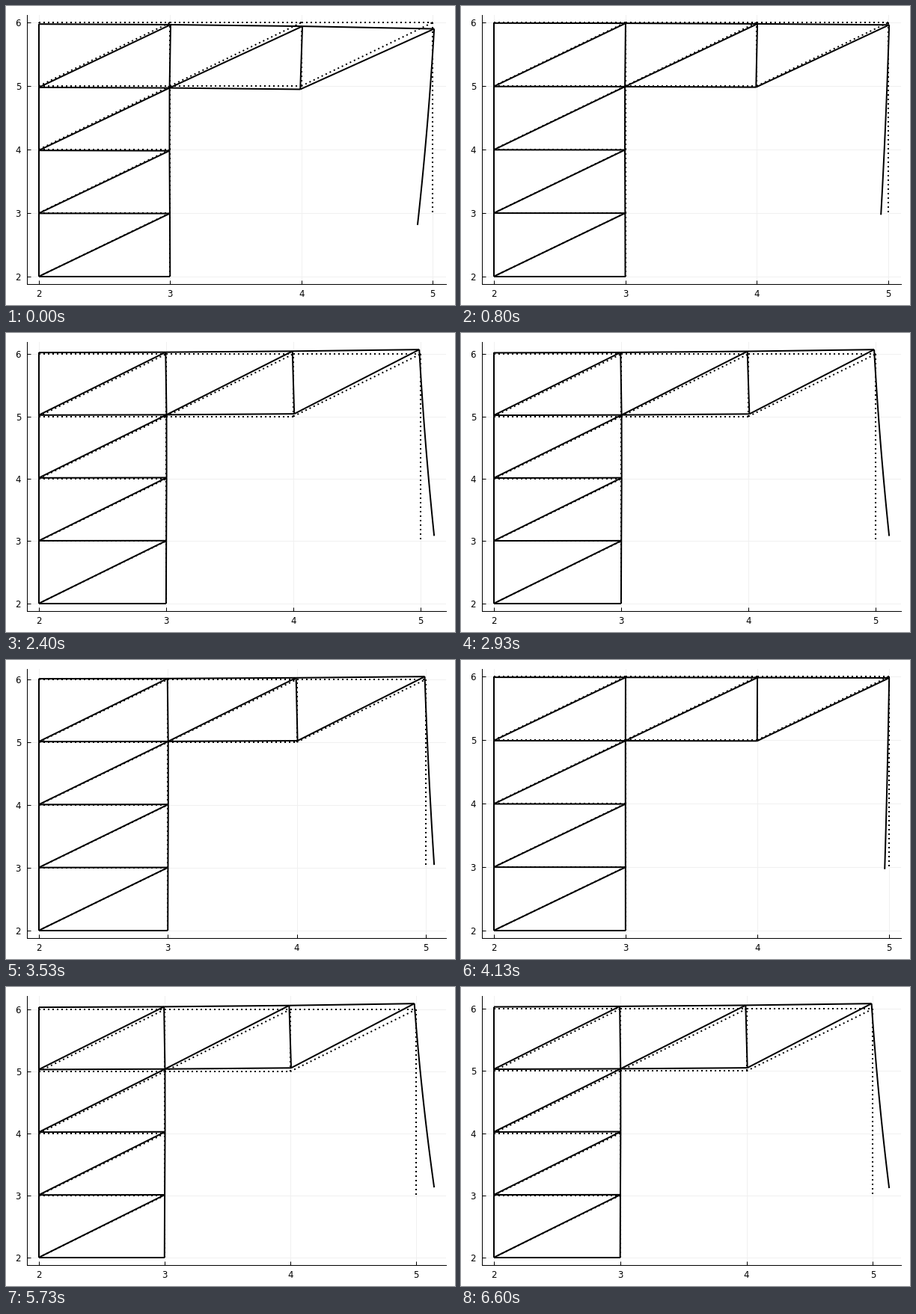
Write a matplotlib script that moves like this. It is 600 px wide and 400 px high and loops after 6670 ms.

```python
"""A plane crane frame swinging freely, drawn over its rest shape."""
import numpy as np
import matplotlib.pyplot as plt
from matplotlib.animation import FuncAnimation
from matplotlib.collections import LineCollection

FRAMES, INTERVAL = 100, 66.6
PT = 0.72  # points per pixel at 100 dpi
TAU = 2 * np.pi
KNEE, TIP = (5, 6), (5, 3)

# Truss bars; the hanging bar is handled apart
BARS = [((x, y), (x, y + 1)) for x in (2, 3) for y in range(2, 6)]
BARS += [((2, y), (3, y)) for y in range(2, 7)]
BARS += [((2, y), (3, y + 1)) for y in range(2, 6)]
BARS += [((x, y), (x + 1, y)) for x, y in ((3, 5), (3, 6), (4, 6))]
BARS += [((x, 5), (x + 1, 6)) for x in (3, 4)]
BARS += [((4, 5), (4, 6))]
BARS = np.array(BARS, float)


def signals(step):
    """Main swing, slow drift and the quickly fading bounce of the load."""
    swing = -np.cos(TAU * 0.2382 * step)
    drift = np.cos(TAU * (step - 14) / 78)
    bounce = -np.exp(-step / 12) * np.cos(TAU * 0.31 * step)
    return swing, drift, bounce


def deflect(points, swing, drift, bounce):
    """Move truss points: the tower stretches, the arm tilts and bends."""
    x, y = points[..., 0], points[..., 1]
    d, h = x - 2, (y - 2) / 4
    rise = np.sin(np.pi * h / 2) ** 1.5
    dx = 0.004 * d * h**2 * (10 - 11 * h) * swing
    dy = rise * ((0.028 + 0.002 * d + 0.0055 * d**2) * swing
                 + (0.010 + 0.0017 * d) * drift
                 + 0.0024 * d**2 * bounce)
    return points + np.stack([dx, dy], axis=-1)


def hanging_bar(knee, swing, drift, bounce):
    """Bar below the knee: swings sideways with a slight bow and stretches."""
    s = np.linspace(0, 1, 25)
    side = 0.137 * swing + 0.024 * drift
    stretch = 0.020 * swing + 0.015 * drift + 0.078 * bounce
    x = knee[0] + side * (0.7 * s + 0.3 * s**2)
    y = knee[1] + s * (TIP[1] - KNEE[1] + stretch)
    return np.column_stack([x, y])


plt.rcParams["font.family"] = "DejaVu Sans"
fig = plt.figure(figsize=(6, 4), dpi=100, facecolor="white")
ax = fig.add_axes([28 / 600, 28 / 400, 560 / 600, 360 / 400])
ax.set_xticks(range(2, 6))
ax.set_yticks(range(2, 7))
ax.tick_params(direction="in", length=5 * PT, width=PT, labelsize=8.5)
ax.tick_params(axis="x", pad=7 * PT)
ax.tick_params(axis="y", pad=8 * PT)
ax.grid(color="#f0f0f0", linewidth=PT)
ax.set_axisbelow(True)
ax.spines[["top", "right"]].set_visible(False)
ax.spines[["left", "bottom"]].set_linewidth(PT)

rest = LineCollection([*BARS, np.array([KNEE, TIP])], colors="black",
                      linewidths=2 * PT, linestyles=[(0, (1, 2))], zorder=3)
moved = LineCollection([], colors="black", linewidths=2 * PT, zorder=4)
ax.add_collection(rest, autolim=False)
ax.add_collection(moved, autolim=False)


def update(step):
    now = signals(step)
    bars = deflect(BARS, *now)
    rope = hanging_bar(deflect(np.array(KNEE, float), *now), *now)
    moved.set_segments([*bars, rope])

    # Fit the view to both shapes with a 3 % margin
    pts = np.vstack([BARS.reshape(-1, 2), bars.reshape(-1, 2), rope])
    lo, hi = pts.min(axis=0), pts.max(axis=0)
    pad = 0.03 * (hi - lo)
    ax.set_xlim(lo[0] - pad[0], hi[0] + pad[0])
    ax.set_ylim(lo[1] - pad[1], hi[1] + pad[1])
    return moved,


anim = FuncAnimation(fig, update, frames=FRAMES, interval=INTERVAL,
                     repeat=True, repeat_delay=0, blit=False)
plt.show()
```
